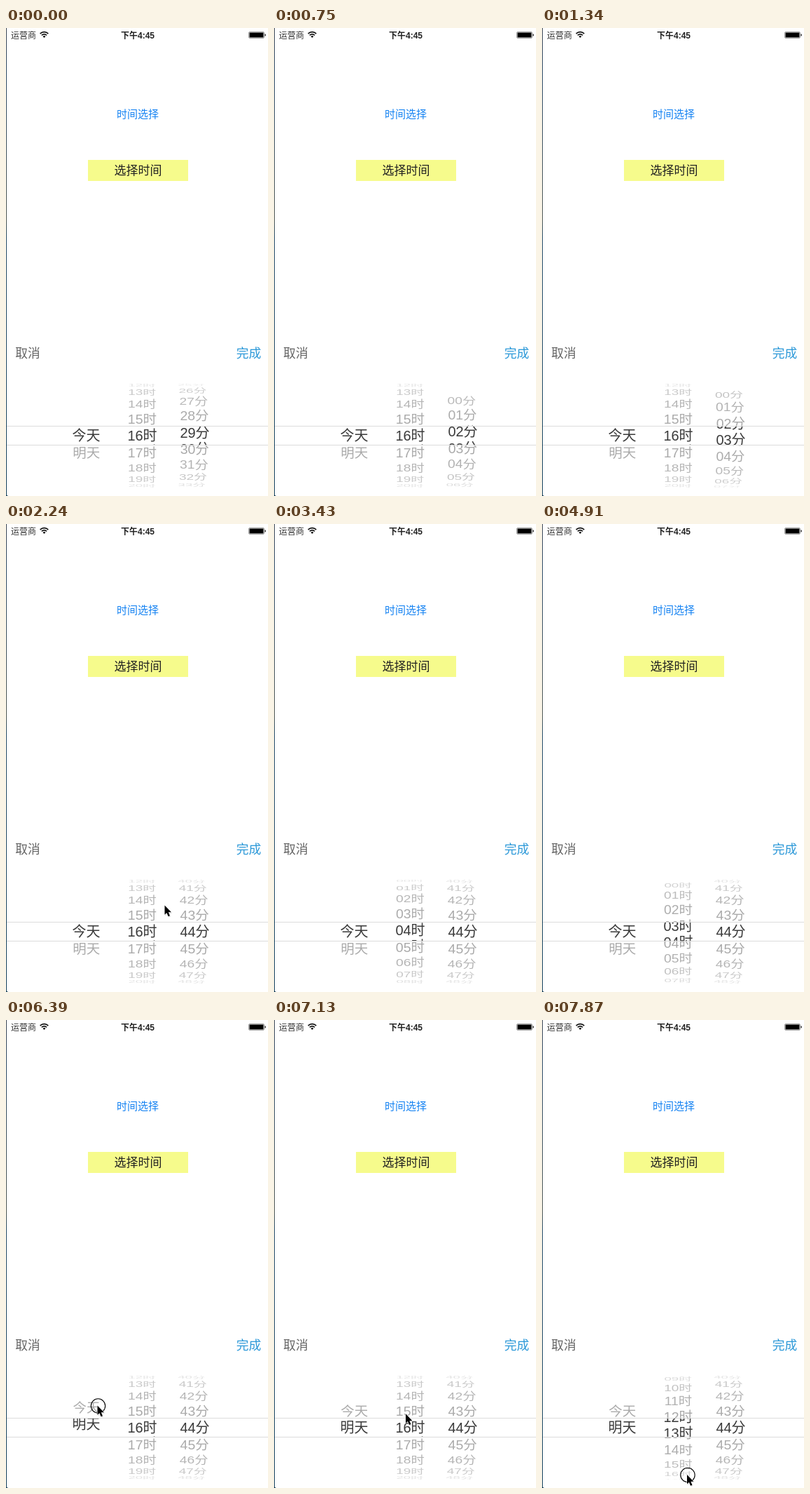
An HTML page for the animation above (8000 ms loop, 374 by 667 pixels).

```html
<!DOCTYPE html>
<html lang="zh-CN">
<head>
<meta charset="utf-8">
<title>时间选择</title>
<style>
  html, body { margin: 0; width: 100%; height: 100%; overflow: hidden; background: #fff; }
  svg { display: block; width: 374px; height: 667px; }
  text { font-family: "Liberation Sans", "Noto Sans CJK SC", "Noto Sans CJK", sans-serif; text-anchor: middle; white-space: pre; }
  .light { font-weight: 300; }
</style>
</head>
<body>
<svg viewBox="0 0 374 667" xmlns="http://www.w3.org/2000/svg">
  <defs>
    <linearGradient id="edge" x1="0" y1="0" x2="0" y2="1">
      <stop offset="0" stop-color="#3c4552"/>
      <stop offset=".1" stop-color="#2a4864"/>
      <stop offset=".41" stop-color="#4d5550"/>
      <stop offset=".45" stop-color="#234a66"/>
      <stop offset="1" stop-color="#123f5a"/>
    </linearGradient>
    <clipPath id="band"><rect x="0" y="568" width="374" height="26"/></clipPath>
    <clipPath id="wheel">
      <rect x="0" y="507" width="374" height="60.5"/>
      <rect x="0" y="594.5" width="374" height="61"/>
    </clipPath>
  </defs>
  <rect width="374" height="667" fill="#fff"/>
  <rect width="1" height="667" fill="url(#edge)"/>
  <path d="M0 663Q.5 666.500 3.500 667H0Z" fill="#143c56"/>

  <text x="25" y="14.500" font-size="12" fill="#333">运营商</text>
  <g fill="none" stroke="#111" stroke-width="1.700">
    <path d="M48.700 8.100a8.200 8.200 0 0 1 11.600 0"/>
    <path d="M50.900 10.400a5.100 5.100 0 0 1 7.200 0"/>
    <path d="M54.500 14l-2-2.100a2.900 2.900 0 0 1 4 0Z" fill="#111" stroke="none"/>
  </g>
  <text x="188" y="14.500" font-size="12" font-weight="700" fill="#222">下午4:45</text>
  <rect x="346.500" y="5.500" width="22" height="9" rx="1.500" fill="none" stroke="#a0a0a0"/>
  <rect x="347.500" y="6.500" width="20" height="7" fill="#000"/>
  <path d="M369.500 8.200q1.500 .3 1.500 1.800t-1.500 1.800Z" fill="#222"/>

  <text x="188" y="127.500" font-size="15" fill="#1482f2">时间选择</text>
  <rect x="117" y="188" width="143" height="30" fill="#f6fb8c"/>
  <text x="188.500" y="209" font-size="17" fill="#222">选择时间</text>
  <text class="light" x="31" y="469.500" font-size="17.800" fill="#666">取消</text>
  <text class="light" x="346.500" y="469.500" font-size="17.800" fill="#2b98d8">完成</text>

  <g id="far" class="light" clip-path="url(#wheel)" font-size="19.600"></g>
  <g id="near" class="light" clip-path="url(#band)" font-size="20" fill="#3a3a3a"></g>
  <path d="M1 567.500H374M1 594.500H374" stroke="#dcdcdc"/>

  <g id="cursor">
    <circle id="ring" cx="1" cy=".5" r="10.200" fill="none" stroke="#000" stroke-width="1.100"/>
    <g transform="scale(.92)">
      <path d="M.8 1.500V16l3.200-3 2.300 5.400 2.800-1.200L6.800 12h4.600Z" fill="#000" opacity=".2"/>
      <path d="M0 0V14.500l3.200-2.900 2.300 5.400 2.600-1.100-2.300-5.200h4.500Z" fill="#000" stroke="#fff" stroke-width="1.200" stroke-linejoin="round" paint-order="stroke"/>
    </g>
  </g>
</svg>
<script>
const $ = id => document.getElementById(id);
const LOOP = 8000, STEP = 148.4;            // the screen refreshes once per STEP
const MID_X = 187, MID_Y = 581, RADIUS = 74, ANGLE = 0.33, ROW = 23.2, DEPTH = 930;
const REACH = 5, BASE = 7;

const clamp = u => Math.min(1, Math.max(0, u));
const lerp = (a, b, u) => a + (b - a) * u;
const smooth = u => u < .5 ? 4 * u ** 3 : 1 - 4 * (1 - u) ** 3;
const pad = (n, unit) => String(n).padStart(2, '0') + unit;

// A flung wheel slows down exponentially; a rejected time snaps back.
const coast = (from, to, n, drag) => to + (from - to) * Math.exp(-drag * Math.max(0, n));
const snap = (from, to, u) => lerp(from, to, smooth(clamp(u)));
const rubber = row => Math.max(row, row * .3);

function dayAt(n) {
  if (n < 43) return 0;
  const over = lerp(.2, .33, clamp(n - 43));
  return 1 + over * (1 - clamp((n - 45) / 2));
}

function hourAt(n) {
  if (n <= 24) return coast(16, 3, n - 16, .355);
  if (n <= 28) return snap(3, 16, (n - 24) / 3);
  if (n <= 33) return coast(16, 3, n - 28, .73);
  if (n <= 35) return snap(3, 16, (n - 33) / 2);
  return lerp(16, 12.65, clamp((n - 49) / 4));
}

function minuteAt(n) {
  return n < 8 ? rubber(coast(29.19, -5.5, n, .3)) : snap(0, 44, (n - 8) / 4);
}

const columns = [
  { x: 114.5, count: 2, rowAt: dayAt, label: i => ['今天', '明天'][i] },
  { x: 194.5, count: 24, rowAt: hourAt, label: i => pad(i, '时') },
  { x: 269.5, count: 60, rowAt: minuteAt, label: i => pad(i, '分') }
];

// The pointer glides to the wheel, presses, drags and holds until the end.
const gestures = [
  { start: 15, press: 16, drop: 19, end: 19, from: [226.5, 543.5], grab: [206, 545], to: [206, 655] },
  { start: 26, press: 28, drop: 30, end: 30, from: [246, 650], grab: [206, 545], to: [206, 655] },
  { start: 37, press: 42, drop: 43, end: 45, from: [288, 603], grab: [126.5, 597], to: [130.5, 549.5] },
  { start: 46, press: 49, drop: 53, end: 53, from: [150, 552], grab: [207, 566], to: [207, 648] }
];

function makeText(parent) {
  const el = document.createElementNS('http://www.w3.org/2000/svg', 'text');
  el.setAttribute('y', BASE);
  parent.appendChild(el);
  return el;
}

for (const col of columns) {
  col.far = Array.from({ length: 2 * REACH + 1 }, () => makeText($('far')));
  col.near = Array.from({ length: 5 }, () => makeText($('near')));
}

function place(el, col, i, x, y, sx, sy) {
  const label = i >= 0 && i < col.count ? col.label(i) : '';
  if (el.textContent !== label) el.textContent = label;
  el.setAttribute('transform', `translate(${x} ${y}) scale(${sx} ${sy})`);
}

function drawColumn(col, n) {
  const pos = col.rowAt(n), first = Math.round(pos);
  col.far.forEach((el, k) => {
    const i = first + k - REACH, turn = (i - pos) * ANGLE;
    const cos = Math.max(0, Math.cos(turn));
    const s = 1 / (1 + RADIUS * (1 - cos) / DEPTH);
    const shown = Math.abs(turn) < Math.PI / 2;
    place(el, col, shown ? i : -1, lerp(MID_X, col.x, s),
      MID_Y + RADIUS * Math.sin(turn), s, s * cos);
    el.setAttribute('opacity', .35 * cos ** .85);
  });
  col.near.forEach((el, k) => {
    const i = first + k - 2;
    place(el, col, i, col.x, MID_Y + (i - pos) * ROW, 1, 1);
  });
}

function drawCursor(n) {
  const g = gestures.find(g => n >= g.start && n <= g.end);
  $('cursor').style.display = g ? '' : 'none';
  if (!g) return;
  const near = clamp((n - g.start) / Math.min(3, g.press - g.start));
  const pulled = clamp((n - g.press) / (g.drop - g.press));
  const [x, y] = g.from.map((v, k) => lerp(lerp(v, g.grab[k], near), g.to[k], pulled));
  $('cursor').setAttribute('transform', `translate(${x} ${y})`);
  $('ring').style.display = n > g.press ? '' : 'none';
}

function draw(ms) {
  const n = Math.floor(ms % LOOP / STEP);
  columns.forEach(col => drawColumn(col, n));
  drawCursor(n);
}

const start = performance.now();
function tick() {
  draw(performance.now() - start);
  requestAnimationFrame(tick);
}
tick();
</script>
</body>
</html>
```
